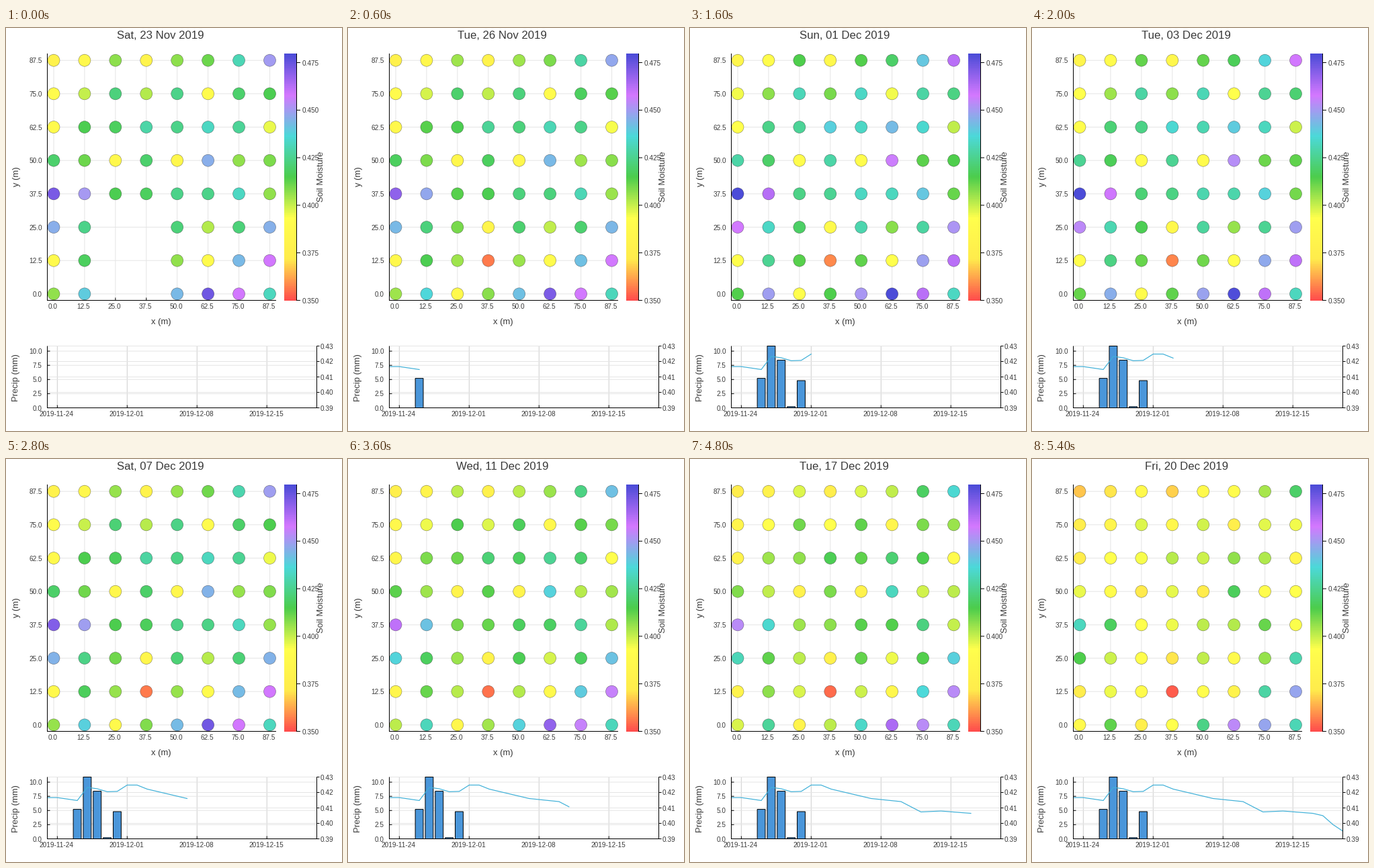
Animation of 500 by 600 pixels, one loop 5600 ms. Source, as a matplotlib script:

```python
import numpy as np
import matplotlib.pyplot as plt
from matplotlib.animation import FuncAnimation
from matplotlib.colors import LinearSegmentedColormap
from matplotlib.patches import Rectangle

W, H, DPI = 500, 600, 100
PT = 72 / DPI
DAYS = 28
INK = "#3a3a3a"

plt.rcParams["font.family"] = "Liberation Sans"
plt.rcParams["path.snap"] = False
fig = plt.figure(figsize=(W / DPI, H / DPI), dpi=DPI, facecolor="white")
ax = fig.add_axes([0, 0, 1, 1])
ax.axis("off")

cmap = LinearSegmentedColormap.from_list("moisture", [
    "#ff4d4c", "#ffec4c", "#ffff4c", "#4ccd4c", "#4cd9d9", "#d478ff", "#4c4cd8"])


def line(x0, y0, x1, y1, color="black", z=1):
    ax.plot([x0, x1], [y0, y1], color=color, lw=PT, zorder=z,
            solid_capstyle="butt")


def grid(x0, y0, x1, y1, color="#e5e5e5"):
    line(x0, y0, x1, y1, color, 0)


def label(x, y, s, size=10, ha="center", rot=0):
    ax.text(x, y, s, fontsize=size * PT, ha=ha, rotation=rot, color=INK,
            va="center" if rot else "center_baseline", zorder=6)


# Moisture map
L, R, TOP, BASE = 61.5, 402, 38, 405.5
col_x = 71 + 45.93 * np.arange(8)
row_y = 48.2 + 49.67 * np.arange(8)
for k in range(8):
    x, y = col_x[k], row_y[7 - k]
    grid(x, TOP, x, BASE)
    grid(L, y, R, y)
    line(x, BASE, x, BASE - 4)
    line(L, y, L + 4, y)
    label(x - 1.5, 414.5, f"{12.5 * k:.1f}")
    label(54, y, f"{12.5 * k:.1f}", ha="right")
line(L, TOP, L, BASE + 0.5)
line(L - 0.5, BASE, R, BASE)
label(230.5, 437, "x (m)", 13)
label(16, 221.5, "y (m)", 13, rot=90)
title = ax.text(229.8, 16, "", fontsize=16.8 * PT, ha="center", color=INK)

# Colour bar
ax.imshow(np.linspace(1, 0, 368)[:, None], cmap=cmap, vmin=0, vmax=1,
          extent=(414, 432, 406, 38), aspect="auto", zorder=1)
line(432.5, 38, 432.5, 406)
for k in range(6):
    y = 405.5 - k * 70.8
    line(432.5, y, 438, y)
    label(441, y, f"{0.35 + 0.025 * k:.3f}", ha="left")
label(469, 221, "Soil Moisture", 13, rot=90)

# Rain chart
RL, RR, RT, RB = 61.5, 462.5, 473.5, 565.5
STEP = (RR - RL) / (DAYS - 1)


def day_x(d):
    return RL + STEP * d


def rain_y(mm):
    return RB - 8.44 * mm


def mean_y(v):
    return RB - 2300 * (v - 0.39)


for d, s in zip((1, 8, 15, 22), ("11-24", "12-01", "12-08", "12-15")):
    grid(day_x(d), RT, day_x(d), RB, "#cecece")
    line(day_x(d), RB, day_x(d), RB - 4)
    label(day_x(d) - 1, 574, "2019-" + s)
for k in range(5):
    y = rain_y(2.5 * k)
    grid(RL, y, RR, y)
    line(RL, y, RL + 4, y)
    label(53.5, y, f"{2.5 * k:.1f}", ha="right")
    y = mean_y(0.39 + 0.01 * k)
    grid(RL, y, RR, y)
    line(RR, y, RR + 4, y)
    label(467.5, y, f"{0.39 + 0.01 * k:.2f}", ha="left")
line(RL, RT, RL, RB + 0.5, z=5)
line(RR, RT, RR, RB + 0.5, z=5)
line(RL - 0.5, RB, RR + 0.5, RB, z=5)
label(15, 520.5, "Precip (mm)", 13, rot=90)

bars = {}
for d, mm in {3: 5.2, 4: 10.9, 5: 8.4, 6: 0.2, 7: 4.8}.items():
    bars[d] = ax.add_patch(Rectangle(
        (day_x(d) - 0.4 * STEP, rain_y(mm)), 0.8 * STEP, RB - rain_y(mm),
        fc="#4a96da", ec="black", lw=PT, zorder=3))

# Mean moisture: rain lifts it twice, then it dries out
turns = {0: .4167, 1: .4167, 3: .4148, 4: .4233, 5: .4224, 6: .4205, 7: .4207,
         8: .4248, 9: .4248, 10: .4222, 14: .4161, 17: .4141, 19: .4074,
         21: .4080, 24: .4065, 25: .4050, 26: .3993, 27: .3950}
days = np.arange(DAYS)
mean = np.interp(days, list(turns), list(turns.values()))
curve, = ax.plot([], [], color="#3fb0d8", lw=1.2 * PT, zorder=4)

# Usual level of each station, 0 (red end of the scale) to 60 (blue end)
usual = np.array([
    [13, 16, 26, 14, 26, 28, 37, 46],
    [18, 23, 33, 24, 34, 18, 32, 30],
    [17, 30, 31, 36, 34, 38, 35, 21],
    [32, 28, 16, 32, 16, 44, 26, 27],
    [56, 46, 30, 31, 34, 34, 38, 26],
    [44, 34, 28, 15, 33, 24, 33, 44],
    [17, 31, 26, 3, 26, 18, 43, 50],
    [26, 41, 17, 27, 43, 57, 50, 38]])

# Wet stations swing more, the lower right corner hardly at all
row, col = np.indices(usual.shape)
swing = (1 + 0.03 * (usual - 28)) * (1 - 0.95 * ((row + col) / 14) ** 4)


def levels(day):
    v = usual + swing * (mean[day] - mean[14]) * 60 / 0.13
    if day < 3:
        v[5:, 2:4] = np.nan
    elif 4 <= day <= 6:
        v[0, [0, 4]] = np.nan
    return v.ravel()


spots = np.column_stack([np.tile(col_x, 8), np.repeat(row_y, 8)])
dots = ax.scatter([], [], s=(18 * PT) ** 2, lw=0.5 * PT,
                  edgecolors=(0.1, 0.1, 0.1, 0.6), zorder=3)

ax.set_xlim(0, W)
ax.set_ylim(H, 0)

WEEK = ("Sat", "Sun", "Mon", "Tue", "Wed", "Thu", "Fri")


def update(day):
    date = 23 + day
    month = "Nov" if date <= 30 else "Dec"
    title.set_text(f"{WEEK[day % 7]}, {(date - 1) % 30 + 1:02d} {month} 2019")
    v = levels(day)
    ok = np.isfinite(v)
    dots.set_offsets(spots[ok])
    dots.set_facecolors(cmap(v[ok] / 60))
    for d, bar in bars.items():
        bar.set_visible(d <= day)
    curve.set_data(day_x(days[:day + 1]), mean_y(mean[:day + 1]))
    return title, dots, curve, *bars.values()


anim = FuncAnimation(fig, update, frames=DAYS, interval=200, repeat=True)
plt.show()
```
